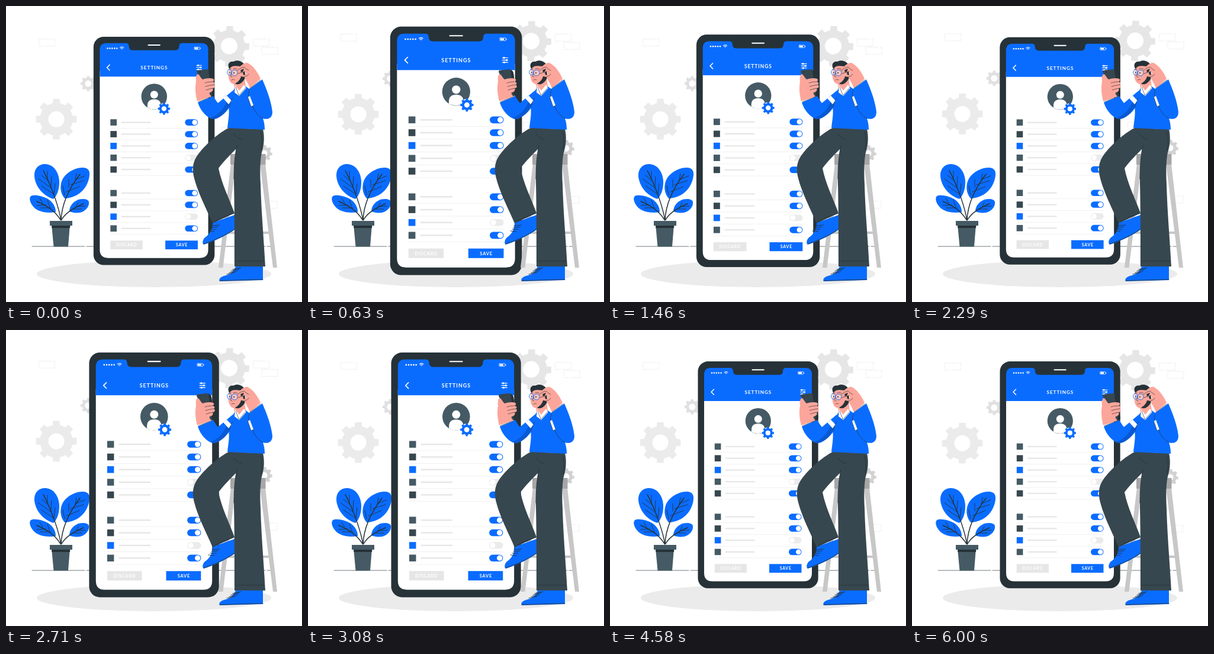
These frames come from a looping animation (500 by 500 pixels, 6040 ms). An HTML page:

```html
<!DOCTYPE html>
<html lang="en">
<head>
<meta charset="utf-8">
<title>Settings</title>
<style>
  html, body { margin: 0; width: 100%; height: 100%; overflow: hidden; background: #fff; }
  svg { display: block; width: 100vw; height: 100vh; }
  text { font-family: Lato, "Open Sans", sans-serif; font-weight: 700; fill: #fff; text-anchor: middle; }
  .blue { fill: #0a6cff; }
  .dark { fill: #263238; }
  .slate { fill: #37474f; }
  .steel { fill: #455a64; }
  .skin { fill: #fca69b; }
  .white { fill: #fff; }
  .pale { fill: #ebebeb; }
  .ink { fill: none; stroke: #263238; stroke-width: .9; stroke-linecap: round; stroke-linejoin: round; }
  .stem { stroke-width: 1.5; }
  .fine { stroke-width: .65; }
  .line { fill: none; stroke: #fff; stroke-linecap: round; stroke-linejoin: round; }
  .card { fill: none; stroke: #ededed; stroke-width: .8; stroke-dasharray: 22 2 9 1; }
</style>
</head>
<body>
<svg viewBox="0 0 500 500">
  <ellipse class="pale" cx="250" cy="452.5" rx="198" ry="22.5"/>
  <path class="ink fine" d="M44 406.100H133M136 406.100H412M417 406.100H438M441 406.100H448"/>

  <g id="float">
    <g id="cards"></g>
    <g id="gears" fill-rule="evenodd"></g>
  </g>

  <g id="plant">
    <path class="blue" d="M80 326C64 321 50 307 48 288C47 275 55 267 66 267C80 267 90 281 90 298C90 310 86 321 80 326Z"/>
    <path class="blue" d="M99 325C91 316 90 301 97 290C105 279 118 273 130 273C138 273 142 278 141 286C140 298 133 311 122 318C115 322 107 325 99 325Z"/>
    <path class="blue" d="M84 348C72 350 57 349 48 341C41 334 38 325 42 321C48 318 62 321 71 326C80 332 84 340 84 348Z"/>
    <path class="blue" d="M107 347C107 338 113 331 122 327C131 325 139 326 140 331C141 339 134 347 125 349C118 350 112 349 107 347Z"/>
    <path class="ink stem" d="M93 362C90 345 80 310 63 278M93 362C94 335 105 310 125 284M92 361C82 345 68 337 52 330M94 361C100 350 114 341 131 334"/>
    <path class="ink" d="M81 318L60 304M77 308L55 292M72 296L60 286M81 318L83 300M76 305L77 288M70 291L70 279
      M99 319L96 304M102 314L124 305M106 306L106 293M109 302L131 295M117 294L119 283M118 293L133 287
      M76 341L58 341M67 336L52 337M74 340L70 328M62 333L57 325M114 343L128 343M120 339L134 338M118 340L122 332"/>
    <path class="steel" d="M77 369H108L105 406.5H80.500Z"/>
    <path class="dark" d="M77 370H108.500L108 375H77.500Z"/>
    <path class="steel" d="M74 363H112V371H74Z"/>
  </g>

  <g id="phone">
    <rect class="dark" x="148.500" y="52.600" width="203.200" height="383.200" rx="17"/>
    <path class="white" d="M159 110H341V410Q341 424 327 424H173Q159 424 159 410Z"/>
    <path class="blue" d="M159 119.600V75Q159 63.500 170 63.500H203Q207.500 63.500 207.800 68Q208 75.300 214 75.300H286Q292 75.300 292.200 68Q292.500 63.500 297 63.500H330Q341 63.500 341 75V119.600Z"/>
    <path class="line" stroke-width="2" d="M240.500 66.700H259.800"/>
    <g id="dots" class="white"></g>
    <path class="line" stroke-width="1" d="M193 70.800Q196 68.400 199 70.800M194.300 72.300Q196 71 197.700 72.300M196 73.600V73.700"/>
    <rect class="line" x="317.600" y="70" width="9.200" height="4.200" rx=".8" stroke-width=".7"/>
    <path class="white" d="M318.500 70.800H324V73.400H318.500ZM327.300 71.200H328.300V73H327.300Z"/>
    <path class="line" stroke-width="1.500" d="M175.500 99.800L171 104.300L175.500 108.800"/>
    <text x="250.400" y="107.500" font-size="8.200" letter-spacing=".95">SETTINGS</text>
    <path class="line" stroke-width="1.100" d="M321.500 100.700H330M321.500 104.200H330M321.500 107.700H330"/>
    <g class="white"><circle cx="324" cy="100.700" r="1.500"/><circle cx="328" cy="104.200" r="1.500"/><circle cx="324.500" cy="107.700" r="1.500"/></g>
    <circle class="steel" cx="250.300" cy="153" r="21.600"/>
    <circle class="white" cx="250.300" cy="149.800" r="6.500"/>
    <path class="white" d="M239 171.500V168C239 161 243 157.500 250.300 157.500C257.500 157.500 261.500 161 261.500 168V171.500Q250 177.500 239 171.500Z"/>
    <circle class="white" cx="266.800" cy="173.400" r="9.500"/>
    <path id="cog" class="blue" fill-rule="evenodd"/>
    <g id="rows"></g>
    <rect x="176.700" y="394.800" width="54.300" height="14.700" fill="#e6e6e6"/>
    <text x="204" y="404.700" font-size="6.900" letter-spacing=".75">DISCARD</text>
    <rect class="blue" x="269" y="394.800" width="54.500" height="14.700"/>
    <text x="296.700" y="404.700" font-size="6.900" letter-spacing=".75">SAVE</text>
  </g>

  <g id="stool">
    <path fill="#c7c7c7" d="M380 266H388L366.500 442H359ZM429 266H438L458 442H451ZM364 381H450V385H364Z"/>
    <path fill="#a6a6a6" d="M379 250H438.500V268H379Z"/>
  </g>

  <g id="man">
    <path class="blue" d="M349 366L386 353Q387 365 386 378C370 389 350 398 334 403C331 401 332 395 336 391C344 386 349 377 349 366Z"/>
    <path class="ink" d="M334 402C352 396 370 388 386 377M345 377L355 377M347 374L358 373M348 371L361 370M342 380L352 381"/>
    <path class="slate" d="M376 206C358 215 332 238 321 256C315 266 315 277 317 287C323 314 340 345 349 367L386 350C377 325 364 300 359 274C368 262 380 250 391 239L404 206Z"/>
    <path class="blue" d="M388 440L434 439V463L361 465C359 461 362 458 368 456C378 454 384 449 388 440Z"/>
    <path class="ink" d="M361 464L434 462M377 450.500L391 447M380 447.500L394 444M383 445L397 442M373 453L387 450"/>
    <path class="slate" d="M376 206L434 208C437 220 436 234 433 244C429 256 429 280 430 300C431 345 436 400 438 440H386C386 395 386 330 385 300C385 278 386 255 390 234Z"/>
    <path class="ink" d="M385 216Q390 224 398 225M390 236Q385 258 385 292M430 212Q434 225 431 243M352 364Q368 355 385 350M388 431H436"/>

    <path class="skin" d="M385 128L403 120L406 145L394 152L386 146Z"/>
    <path class="blue" d="M386 139C379 150 376 160 376 170C378 182 375 195 374 206L437 209Q437 198 434 190C444 193 450 188 450 179C448 160 440 140 433 124L411 140L405 136L394 150Z"/>
    <path class="white" d="M387 134L394 143L402 133L405.500 139L394 152L386 146Z"/>
    <path class="ink fine" d="M388 137L393.500 151L404 139M416 168Q422 184 434 190M411 142Q408 150 411 157"/>
    <path class="white" d="M408.500 154L412 152L418 168L414 170Z"/>
    <path class="ink fine" d="M408.500 154L414 170L418 168"/>

    <path class="blue" d="M324 163L350 152Q354 159 358 164C365 158 374 150 383 143L388 150L377 172C370 182 358 192 349 191C338 188 328 176 324 163Z"/>
    <path fill="#000" opacity=".18" d="M349 191C362 191 376 177 380 160L372 163C367 174 360 183 346 189Z"/>
    <path class="white" d="M367 156L373 151.500L381 160L376 166Z"/>
    <path class="ink fine" d="M377 171Q378 162 383 155M325 162L348 152.500"/>

    <path class="slate" d="M322 111Q322 109 325 108.500L339 107Q345 107 347 113L352 150L345 153L326 121Z"/>
    <path class="dark" d="M342 108Q346 109 347 113L352 150L348 152Z"/>
    <path class="skin" d="M323 161C320 150 319 138 321 128C320 121 321 116 324 115C328 117 328 121 332 124C338 122 345 121 350 123C353 125 350 128 348 128C352 128 354 131 351 133C354 135 353 139 349 139C351 142 348 146 344 146C343 149 345 150 347 153Z"/>
    <path class="ink fine" d="M348 128Q341 128 336 130M351 133Q343 134 337 136M349 139Q343 140 338 142"/>
    <circle class="dark" cx="328" cy="111.500" r="1"/>

    <path class="skin" d="M378 101C376 108 375 115 376 121C377 127 380 131 385 132C391 133 397 130 401 122L402 103L391 98Z"/>
    <path class="dark" d="M398 104C405 111 406 120 402 125C397 132 391 134 387 131C391 129 394 126 396 122C398 118 397 112 396 107Z"/>
    <path class="dark" d="M377 106C373 98 378 93 384 94C390 90 399 93 402 98C405 104 405 111 402 115C399 111 397 107 396 102C390 101 385 101 382 102Z"/>
    <path class="ink fine" d="M376 107L380 106M384 106Q388 104 391 107M381 113L379.500 119L382 120M381 125Q383 123.500 386 124.500"/>
    <g fill="#fff" fill-opacity=".35" stroke="#0a6cff" stroke-width=".9"><ellipse cx="377.300" cy="112" rx="3.600" ry="4.700"/><circle cx="386.200" cy="113" r="5"/></g>
    <circle class="dark" cx="378" cy="112.500" r="1"/><circle class="dark" cx="385" cy="113" r="1.100"/>
    <path class="skin" fill-rule="evenodd" d="M391 107C395 102 402 95 408 96C418 101 426 113 430 123L412 139C409 130 405 126 403 120C398 119 393 118 390 116C389 114 392 113 394 113L400 111L402 106C398 107 395 109 392 110ZM401 111Q405 110 405 115L402 117Q399 114 401 111Z"/>
    <path class="ink fine" d="M391 109Q396 104 402 103Q406 107 410 109M390 115Q397 112 403 111M403 119Q408 119 410 115M412 139L430 125"/>
  </g>
</svg>
<script>
const $ = id => document.getElementById(id);

function cogPath(cx, cy, outer, body, hole, turn = 0) {
  const pts = [], step = Math.PI / 4;
  for (let i = 0; i < 8; i++) {
    for (const [d, r] of [[-.22, body], [-.16, outer], [.16, outer], [.22, body], [.3, body], [.36, body]]) {
      const a = i * step + d + turn;
      pts.push((cx + r * Math.sin(a)).toFixed(2) + ' ' + (cy - r * Math.cos(a)).toFixed(2));
    }
  }
  return `M${pts.join('L')}ZM${cx - hole} ${cy}a${hole} ${hole} 0 1 0 ${2 * hole} 0a${hole} ${hole} 0 1 0 ${-2 * hole} 0Z`;
}

$('gears').innerHTML = [
  ['#ebebeb', 85, 191.500, 34.800, 27.800, 13.500],
  ['#e6e6e6', 377, 68, 34.300, 27, 14, .03],
  ['#e0e0e0', 138.800, 131.300, 13, 10.300, 5.500],
  ['#d2d2d2', 436, 249, 14, 11, 5.500, .1]
].map(([fill, ...g]) => `<path fill="${fill}" d="${cogPath(...g)}"/>`).join('');
$('cog').setAttribute('d', cogPath(266.800, 173.400, 10.300, 8, 4.100));

$('cards').innerHTML = [[55.500, 56], [417.500, 56], [432, 70], [431, 330], [364.500, 205]]
  .map(([x, y]) => `<rect class="card" x="${x}" y="${y}" width="27" height="12"/>`).join('');

$('dots').innerHTML = [0, 1, 2, 3, 4]
  .map(i => `<circle cx="${172 + i * 3.900}" cy="72" r="1.250"/>`).join('');

const tones = ['steel', 'slate', 'blue', 'steel', 'slate', '', 'steel', 'slate', 'blue', 'steel'];
$('rows').innerHTML = tones.map((tone, i) => {
  if (!tone) return '';
  const y = 196.400 + i * 19.780, off = i === 3 || i === 8;
  return `<rect class="${tone}" x="176.800" y="${y - 5.300}" width="10.600" height="10.600"/>
    <rect x="195" y="${y - 1.100}" width="49.500" height="2.200" fill="#e6e6e6"/>
    <rect x="177" y="${y + 9.700}" width="146.500" height=".6" fill="#e8e8e8"/>
    <rect class="${off ? 'pale' : 'blue'}" x="302" y="${y - 5.300}" width="21.600" height="10.600" rx="5.300"/>
    <circle class="white" cx="${off ? 307.400 : 318.300}" cy="${y}" r="4.300"/>`;
}).join('');

const LOOP = 6040, FRAME = 1000 / 24;
const smooth = u => (1 - Math.cos(Math.PI * u)) / 2;
const linear = u => u;
const ease = u => (u + smooth(u)) / 2;

// time, scale, easing towards the next step
const pulse = [
  [-60, 1, ease], [540, 1.101, smooth], [630, 1.0955, linear], [1250, 1.043, linear],
  [1460, 1.025, u => 1 - (1 - u) ** 2], [1900, 1, linear], [2270, 1, ease],
  [2860, 1.1, ease], [3080, 1.079, ease], [3700, 1, linear], [LOOP, 1, linear]
];

function scaleAt(t) {
  const i = pulse.findIndex((p, k) => k + 1 < pulse.length && t < pulse[k + 1][0]);
  const [t0, a, f] = pulse[i], [t1, b] = pulse[i + 1];
  return a + (b - a) * f((t - t0) / (t1 - t0));
}

function draw() {
  const n = Math.floor((performance.now() % LOOP + 5) / FRAME) % 145;
  const phase = (n + .5) / 36 % 1;
  const lift = 10 * (1 - Math.abs(2 * phase - 1));
  $('float').setAttribute('transform', `translate(0 ${-lift})`);
  $('phone').setAttribute('transform',
    `translate(250.100 244.700) scale(${scaleAt(n * FRAME)}) translate(-250.100 -244.200)`);
  requestAnimationFrame(draw);
}
draw();
</script>
</body>
</html>
```
